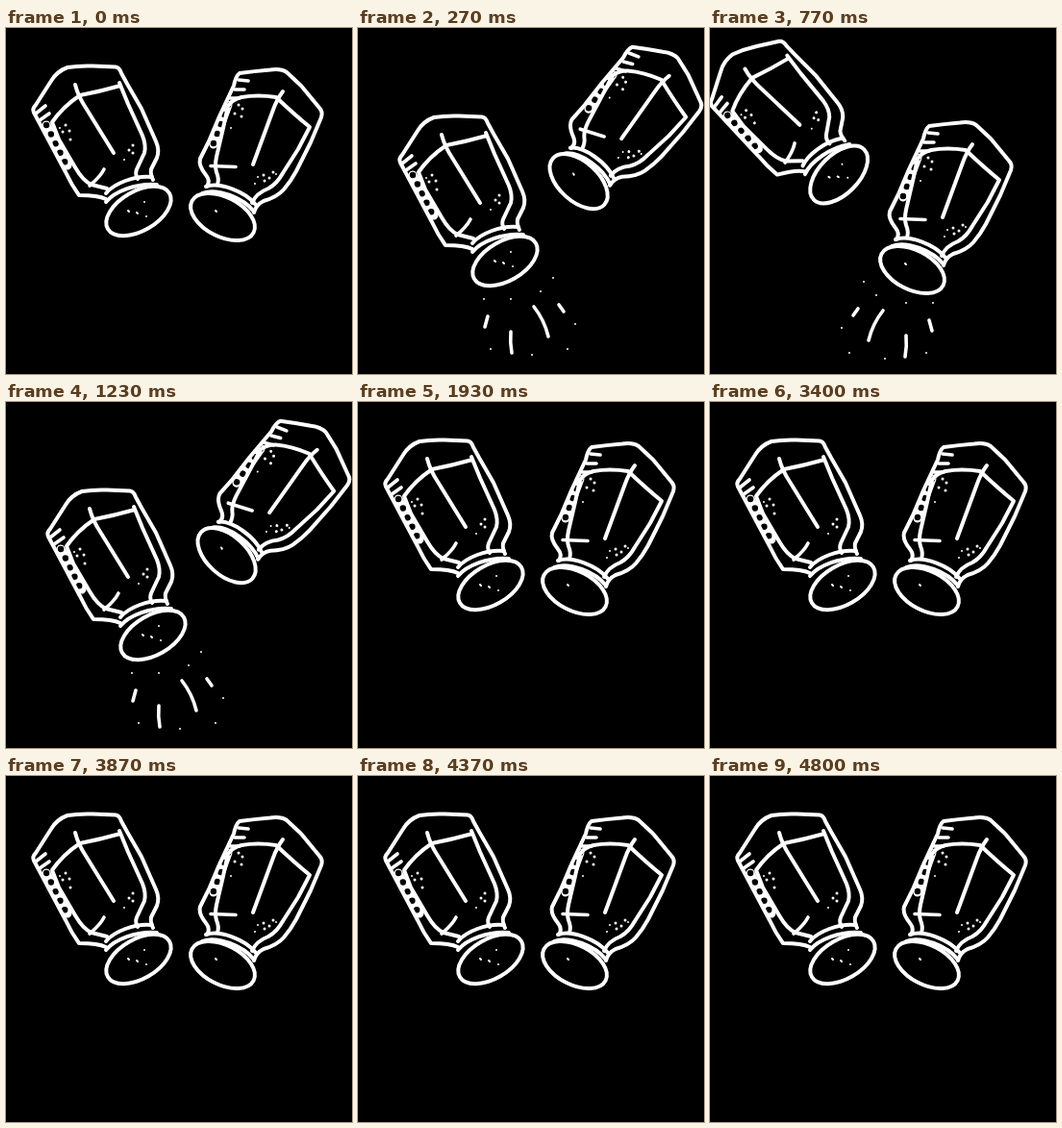
Animation, 360 px wide and 360 px high, one loop 5070 ms. Source, as an HTML page:

```html
<!DOCTYPE html>
<html lang="en">
<head>
<meta charset="utf-8">
<title>Salt shakers</title>
<style>
  html, body { margin: 0; width: 100%; height: 100%; overflow: hidden; background: #000; }
  svg { display: block; width: 100vw; height: 100vh; }
  path, ellipse { fill: none; stroke: #fff; stroke-width: 4; stroke-linecap: round; stroke-linejoin: round; }
  .thin { stroke-width: 3.6; }
  .band { stroke-width: 9; }
  .holes { stroke: #000; stroke-width: 6.5; stroke-dasharray: 0 10.7; }
  .dots { stroke-width: 3; }
  .specks { stroke-width: 2; }
</style>
</head>
<body>
<svg viewBox="0 0 360 360">
  <g id="left">
    <!-- beaded edge -->
    <path class="band" d="M42 101L64 143"/>
    <path class="holes" d="M42 101L64 145"/>
    <!-- glass -->
    <path d="M104 178Q96 174 76 174Q68 163 62 150L45 118L29 88Q27 84 31 80L47 55Q53 45 64 41Q76 39 90 39.500L114 40.500Q118 41 120 47L126 58L141 84L156 118Q160 127 157 135L151 147Q150 152 153 158"/>
    <!-- contents -->
    <path d="M105 167L89 163Q80 159 72 145L55 116L48 98Q59 82 77 70Q98 66 119 60M118 57L127 79L142 112Q146 122 144 130L136 147Q134 152 137 157"/>
    <path d="M72 59Q75 71 83 83L112 130"/>
    <path class="thin" d="M102 147Q98 155 87 164M31 89L41 81M35 96L45 89"/>
    <!-- neck and cap -->
    <path d="M104 172C112 162 134 153 152 155M104 181C113 170 136 161 157 163"/>
    <ellipse cx="138" cy="190.500" rx="37" ry="20.500" transform="rotate(-30 138 190.500)"/>
    <path class="dots" d="M62 101h0M66 107h0M59 108h0M67 116h0M132 122h0M128 127h0M132 130h0"/>
    <path class="specks" d="M56 104h0M123 137h0M127 190l1 1M136 192l1 1M144 181h0M146 196h0"/>
  </g>
  <g id="right">
    <path class="band" d="M231 80L216 121"/>
    <path class="holes" d="M231 80L214 125"/>
    <path d="M209 165Q213 159 208 153Q200 143 202 136L211 118L222 92L237 60Q239 50 243 47Q258 45 275 43.500Q286 42 292 46L307 60L326 83Q330 87 328 93L317 119L302 149Q296 160 289 168Q282 176 268 180Q260 184 258 192"/>
    <path d="M220 163Q222 157 219 150Q217 144 219 134L226 104L231 81Q236 74 245 72Q262 69 281 72Q300 90 316 103L304 126L288 151Q282 162 273 167Q260 172 256 182"/>
    <path d="M288 66Q282 74 278 85L257 142"/>
    <path class="thin" d="M213 143.500L239 144.500M242 54L252 55M238 64L248 64M233 73L243 73"/>
    <path d="M208 165C222 160 249 170 260 184M204 172C220 166 247 177 258 191"/>
    <ellipse cx="225.500" cy="196.500" rx="36" ry="20.500" transform="rotate(27 225.500 196.500)"/>
    <path class="dots" d="M242 80h0M246 84h0M245 92h0M238 89h0M268 153h0M274 156h0M278 150h0M269 159h0"/>
    <path class="specks" d="M234 104h0M281 152h0M262 155h0M259 162h0M218 190l1 1"/>
  </g>
  <g id="salt">
    <path class="thin" d="M154 292L149 299M180 294Q169 308 165 325M204 320Q205 331 203 342M228 304L231 315"/>
    <path class="specks" d="M160 264h0M173 278h0M204 286h0M232 286h0M137 312h0M145 338h0M182 344h0M225 338h0"/>
  </g>
</svg>
<script>
  const LOOP = 5070;
  const cuts = [270, 500, 770, 970, 1230, 1470, 1730, 1930, 2200, 2430,
    2700, 2900, 3130, 3400, 3630, 3870, 4100, 4370, 4600, 4800];
  const rest = { left: '', right: '', salt: null };
  const pourLeft = {
    left: 'translate(15 52)',
    right: 'translate(4 -37) rotate(15 225 197)',
    salt: 'translate(363 -4) scale(-1 1)'
  };
  const pourRight = {
    left: 'translate(-4 -38) rotate(-15 138 190)',
    right: 'translate(-15 55)',
    salt: ''
  };
  const poses = [rest, pourLeft, rest, pourRight];
  const parts = ['left', 'right', 'salt'].map(id => document.getElementById(id));

  function draw(now) {
    const t = now % LOOP;
    const pose = poses[cuts.filter(cut => cut <= t).length % 4];
    for (const part of parts) {
      const move = pose[part.id];
      part.style.display = move === null ? 'none' : '';
      part.setAttribute('transform', move || '');
    }
  }

  const start = performance.now();
  function tick() {
    draw(performance.now() - start);
    requestAnimationFrame(tick);
  }
  tick();
</script>
</body>
</html>
```
